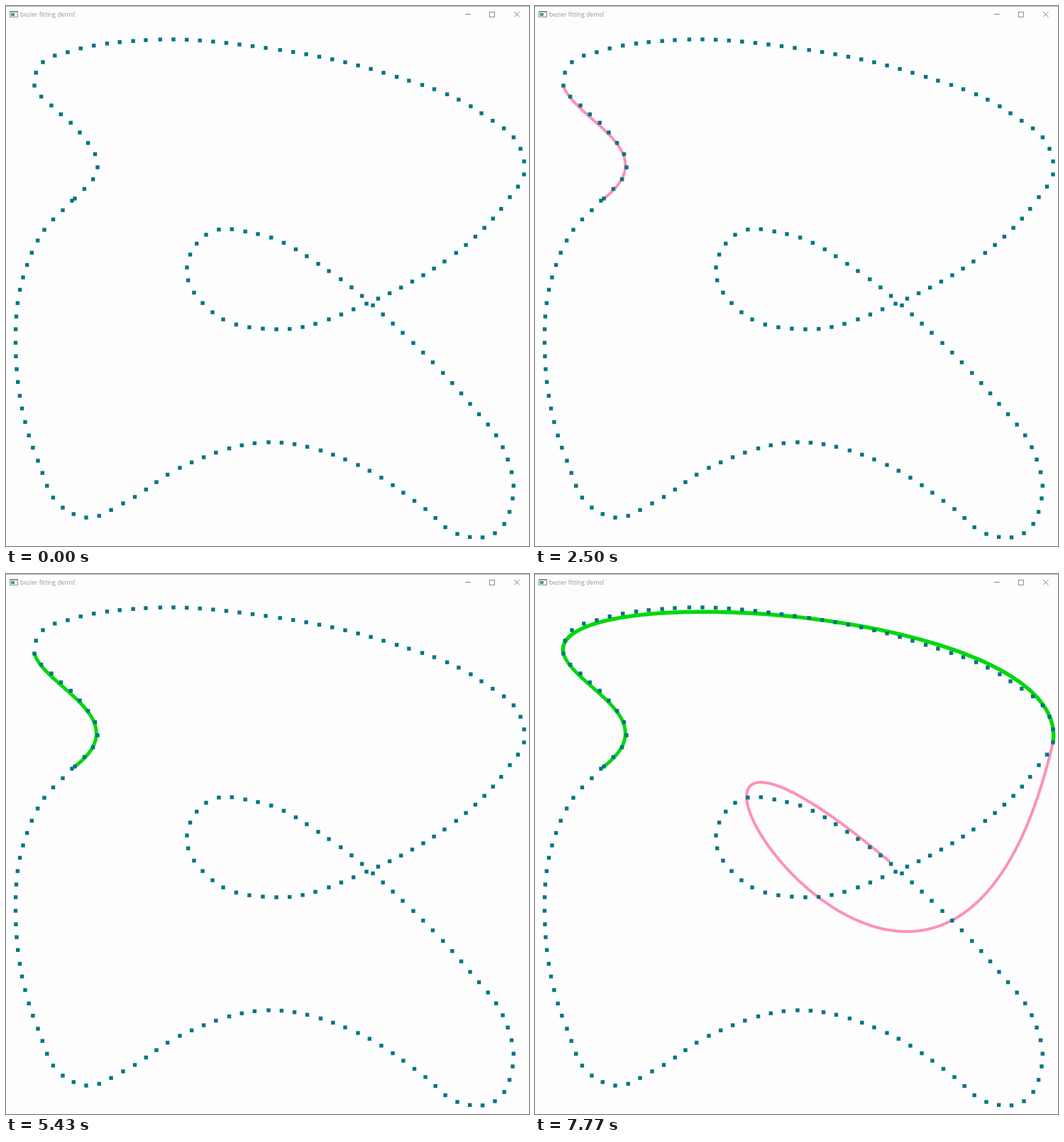
An HTML page with a canvas for the animation above (8000 ms loop, 737x760 px).

```html
<!DOCTYPE html>
<html>
<head>
<meta charset="utf-8">
<style>
  html, body { margin: 0; width: 100%; height: 100%; overflow: hidden; background: #fdfdfd; }
  canvas { display: block; }
</style>
</head>
<body>
<canvas id="stage" width="737" height="760"></canvas>
<script>
const ctx = document.getElementById('stage').getContext('2d');
const LOOP = 8000, SPACING = 18.8;
const PINK = '#ff8fbc', GREEN = '#00d90a', TEAL = '#007580', GRAY = '#8c8c88';

const parsePoints = text => text.split(' ').map(pair => pair.split(',').map(Number));

// Key points of the stroke; a smooth curve through them is split into evenly spaced dots.
const keyPoints = parsePoints(
  '97,271 129,227 104,178 64,140 40,112 52,79 87,65 197,48 366,59 532,94 670,151 725,201 ' +
  '730,237 710,269 508,419 381,455 291,431 255,368 282,322 355,321 455,373 559,460 654,560 ' +
  '700,621 714,693 689,742 636,743 591,708 496,646 370,614 245,650 165,700 113,720 80,706 ' +
  '45,640 14,493 24,382 54,315 93,274');

function bezier([a, b, c, d], t) {
  const s = 1 - t;
  return [0, 1].map(i =>
    s * s * s * a[i] + 3 * s * s * t * b[i] + 3 * s * t * t * c[i] + t * t * t * d[i]);
}

const distance = (a, b) => Math.hypot(b[0] - a[0], b[1] - a[1]);

// Direction at b of the circle through a, b and c.
function tangent(a, b, c) {
  const before = distance(a, b) ** 2, after = distance(b, c) ** 2;
  const [x, y] = [0, 1].map(i => (b[i] - a[i]) / before + (c[i] - b[i]) / after);
  return Math.atan2(y, x);
}

// Bezier handle that follows a circular arc from one point towards another.
function handle(from, to, angle, sign) {
  const chord = Math.atan2(to[1] - from[1], to[0] - from[0]);
  const direction = sign > 0 ? angle : angle + Math.PI;
  const length = 2 * distance(from, to) / (3 * (1 + Math.cos(direction - chord)));
  return [from[0] + length * Math.cos(direction), from[1] + length * Math.sin(direction)];
}

function evenDots(curve) {
  const samples = Array.from({ length: 101 }, (_, i) => bezier(curve, i / 100));
  const lengths = [0];
  for (let i = 1; i <= 100; i++) lengths[i] = lengths[i - 1] + distance(samples[i - 1], samples[i]);
  const steps = Math.round(lengths[100] / SPACING);
  return Array.from({ length: steps }, (_, k) =>
    samples[lengths.findIndex(l => l >= lengths[100] * k / steps)]);
}

function strokeDots(points) {
  const count = points.length, angles = points.map((p, i) =>
    tangent(points[(i + count - 1) % count], p, points[(i + 1) % count]));
  // The stroke's ends nearly meet, so each borrows the neighbour beyond the gap.
  angles[0] = tangent(points[count - 2], points[0], points[1]);
  angles[count - 1] = tangent(points[count - 2], points[count - 1], points[1]);
  const dots = [points[count - 1]];
  for (let i = 0; i < count - 1; i++) {
    const a = points[i], d = points[i + 1];
    dots.push(...evenDots([a, handle(a, d, angles[i], 1), handle(d, a, angles[i + 1], -1), d]));
  }
  return dots;
}

const dots = strokeDots(keyPoints);

// keys: [ms, curve parameter]; a fit is later accepted (green) or cleared.
const fits = [
  { curve: '97,271 185,203 55,160 40,112', keys: [[1770, 0], [2490, 1]], accept: 2600, width: 5 },
  { curve: '40,112 -45,-155 1335,400 440,452', keys: [[2600, 0], [3750, 1]], clear: 4400 },
  { curve: '40,112 38,0 960,52 658,317', keys: [[4400, 0], [4900, 1], [5400, 1.148]], clear: 5430 },
  { curve: '40,112 15,2 756,48 730,237',
    keys: [[5430, 0], [5930, .28], [6170, .28], [6350, .85], [6500, 1]], accept: 6500, width: 5.5 },
  { curve: '730,237 566,938 0,-16 500,405', keys: [[6550, 0], [7130, .6], [7470, .6], [7770, 1]] }
].map(fit => ({ ...fit, curve: parsePoints(fit.curve) }));

function progress(keys, ms) {
  const next = keys.findIndex(([time]) => ms < time);
  if (next === 0) return 0;
  if (next < 0) return keys[keys.length - 1][1];
  const [t0, a] = keys[next - 1], [t1, b] = keys[next];
  return a + (b - a) * (ms - t0) / (t1 - t0);
}

function drawFit(fit, ms) {
  const end = progress(fit.keys, ms);
  if (!end || ms >= fit.clear) return;
  const accepted = ms >= fit.accept;
  ctx.strokeStyle = accepted ? GREEN : PINK;
  ctx.lineWidth = accepted ? fit.width : 4;
  ctx.beginPath();
  for (let i = 0; i <= 100; i++) ctx.lineTo(...bezier(fit.curve, end * i / 100));
  ctx.stroke();
}

function box(color, x, y, w, h) {
  ctx.fillStyle = color;
  ctx.fillRect(x, y, w, h);
}

function line(x0, y0, x1, y1) {
  ctx.beginPath();
  ctx.moveTo(x0, y0);
  ctx.lineTo(x1, y1);
  ctx.stroke();
}

function drawTitleBar() {
  box('#b4b4a6', 0, 0, 737, 1);
  box('#8a9494', 5, 7, 12, 9);
  box('#f4f8f8', 6, 9, 10, 6);
  box('#4f8f90', 7, 10, 5, 4);
  ctx.fillStyle = '#969690';
  ctx.font = '8.6px "Open Sans", sans-serif';
  ctx.fillText('bezier fitting demo!', 20, 15);
  ctx.strokeStyle = GRAY;
  ctx.lineWidth = 1;
  line(647, 11.5, 655, 11.5);
  ctx.strokeRect(681.5, 8.5, 7, 7);
  line(716, 8, 723.5, 15.5);
  line(723.5, 8, 716, 15.5);
}

function frame(now) {
  const ms = now % LOOP;
  box('#fdfdfd', 0, 0, 737, 760);
  drawTitleBar();
  for (const fit of fits) drawFit(fit, ms);
  for (const [x, y] of dots) box(TEAL, x - 2.7, y - 2.7, 5.4, 5.4);
  requestAnimationFrame(frame);
}
requestAnimationFrame(frame);
</script>
</body>
</html>
```
